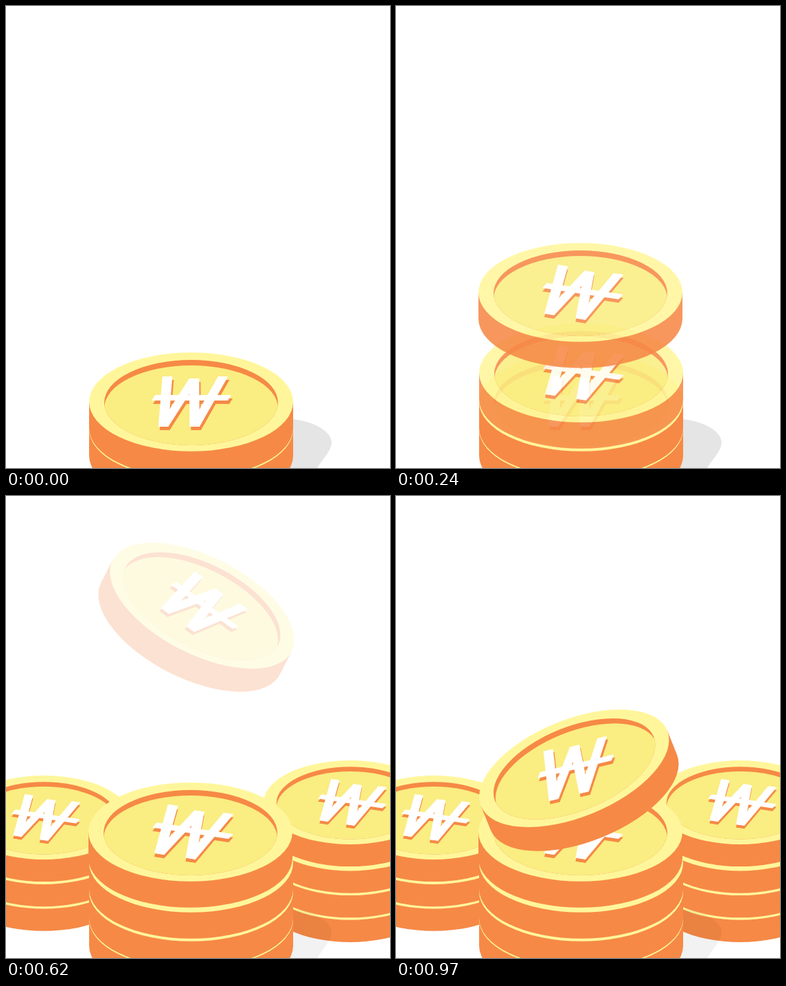
Animation, 559 px wide and 671 px high, one loop 2970 ms. Source, as an HTML page with a canvas:

```html
<!DOCTYPE html>
<html lang="ko">
<head>
<meta charset="utf-8">
<title>Coins</title>
<style>
  html, body { margin: 0; width: 100%; height: 100%; overflow: hidden; background: #fff; }
  canvas { display: block; }
</style>
</head>
<body>
<canvas id="stage" width="559" height="671"></canvas>
<script>
const W = 559, H = 671, LOOP = 2970, STEP = 30;
const SIDE = '#f68946', RIM = '#fff69b', FACE = '#faed82';
const RX = 148.5, RY = 71.8, THICK = 38;

const stage = document.getElementById('stage').getContext('2d');
const buffer = document.createElement('canvas');
buffer.width = W;
buffer.height = H;
const layer = buffer.getContext('2d');

const clamp = (v, lo, hi) => Math.max(lo, Math.min(hi, v));

function ellipse(c, y, rx, ry, color) {
  c.beginPath();
  c.ellipse(0, y, rx, ry, 0, 0, Math.PI * 2);
  c.fillStyle = color;
  c.fill();
}

// slanted limb with level ends, w wide
function limb(c, [ax, ay], [bx, by], w) {
  c.beginPath();
  c.moveTo(ax - w / 2, ay);
  c.lineTo(ax + w / 2, ay);
  c.lineTo(bx + w / 2, by);
  c.lineTo(bx - w / 2, by);
  c.fill();
}

// won sign: a zigzag of four limbs crossed by a bar
function wonShape(c, turned) {
  if (turned) c.transform(1, 0.15, -0.19, 0.985, 2, 2.5);
  const zigzag = [[-34.5, -37], [-40.5, 36], [4.5, -34], [5, 36], [46.5, -37]];
  for (let i = 1; i < zigzag.length; i++) limb(c, zigzag[i - 1], zigzag[i], 14.5);
  const y = turned ? -8.5 : -10;
  limb(c, [3, y], [-2, y + 8], 111);
}

function drawSign(c, turned) {
  for (const [dx, dy, color] of [[turned ? 0 : 2, 5, SIDE], [0, 0, '#fff']]) {
    c.save();
    c.translate(dx, dy);
    c.fillStyle = color;
    wonShape(c, turned);
    c.restore();
  }
}

function drawCoin(c, x, y, { scale = 1, angle = 0, turned = true } = {}) {
  c.save();
  c.translate(x, y);
  c.rotate(angle * Math.PI / 180);
  c.scale(scale, scale);

  c.beginPath();
  c.moveTo(RX, 0);
  c.lineTo(RX, THICK);
  c.ellipse(0, THICK, RX, RY, 0, 0, Math.PI);
  c.lineTo(-RX, 0);
  c.fillStyle = SIDE;
  c.fill();
  ellipse(c, 0, RX, RY, RIM);

  // recessed face: the shifted disc leaves a crescent of shade
  ellipse(c, 1, 126.5, 62, SIDE);
  c.save();
  c.clip();
  ellipse(c, 9, 126.5, 62, FACE);
  c.restore();

  drawSign(c, turned);
  c.restore();
}

function fadeCoin(alpha, x, y, options) {
  if (alpha <= 0) return;
  if (alpha >= 1) return drawCoin(stage, x, y, options);
  layer.clearRect(0, 0, W, H);
  drawCoin(layer, x, y, options);
  stage.globalAlpha = alpha;
  stage.drawImage(buffer, 0, 0);
  stage.globalAlpha = 1;
}

// a smaller stack, drawn from the lowest coin up
function drawSideStack(x, y, count, firstGap) {
  const scale = 0.848;
  for (let i = count - 1; i >= 0; i--) {
    const depth = i ? firstGap + 42 * (i - 1) : 0;
    drawCoin(stage, x, y + depth * scale, { scale });
  }
}

function drawShadow(alpha) {
  stage.beginPath();
  stage.moveTo(400, 599);
  stage.lineTo(418, 600);
  stage.bezierCurveTo(446, 603, 474, 617, 474, 634);
  stage.bezierCurveTo(474, 645, 462, 657, 453, 671);
  stage.lineTo(400, 671);
  stage.fillStyle = `rgba(0,0,0,${alpha})`;
  stage.fill();
}

function drawFrontStack(t) {
  const rise = t < 60 ? 0 : clamp(Math.floor((t - 30) / STEP) / 8, 0, 1);
  drawCoin(stage, 269.5, 615);
  drawCoin(stage, 269.5, 575, { turned: false });
  fadeCoin(rise, 269.5, 533);
  fadeCoin(rise, 268.5, 488 - 576 * (1 - rise));
}

// falls in one pose, then dissolves into the resting one
function drawLastCoin(t) {
  const p = clamp(Math.floor((t - 500) / STEP) / 9, 0, 1);
  const settle = t < 770 ? 0 : t < 870 ? 0.52 : t < 970 ? 0.77 : 1;
  const ghost = t < 870 ? 0.54 * p : 1 - settle;
  fadeCoin(ghost, 285.5, 401 - 435 * (1 - p), { scale: 0.985, angle: 27 });
  fadeCoin(settle, 259.3, 395.5, { scale: 0.985, angle: -22 });
}

function draw(t) {
  stage.fillStyle = '#fff';
  stage.fillRect(0, 0, W, H);
  if (t >= 300) drawSideStack(501, 445, 4, 45.5);
  if (t >= 500) drawSideStack(55, 467, 3, 42.5);
  drawShadow(t < 300 ? 0.1 : 0.05);
  drawFrontStack(t);
  drawLastCoin(t);
}

const start = performance.now();
function tick() {
  draw((performance.now() - start) % LOOP);
  requestAnimationFrame(tick);
}
tick();
</script>
</body>
</html>
```
